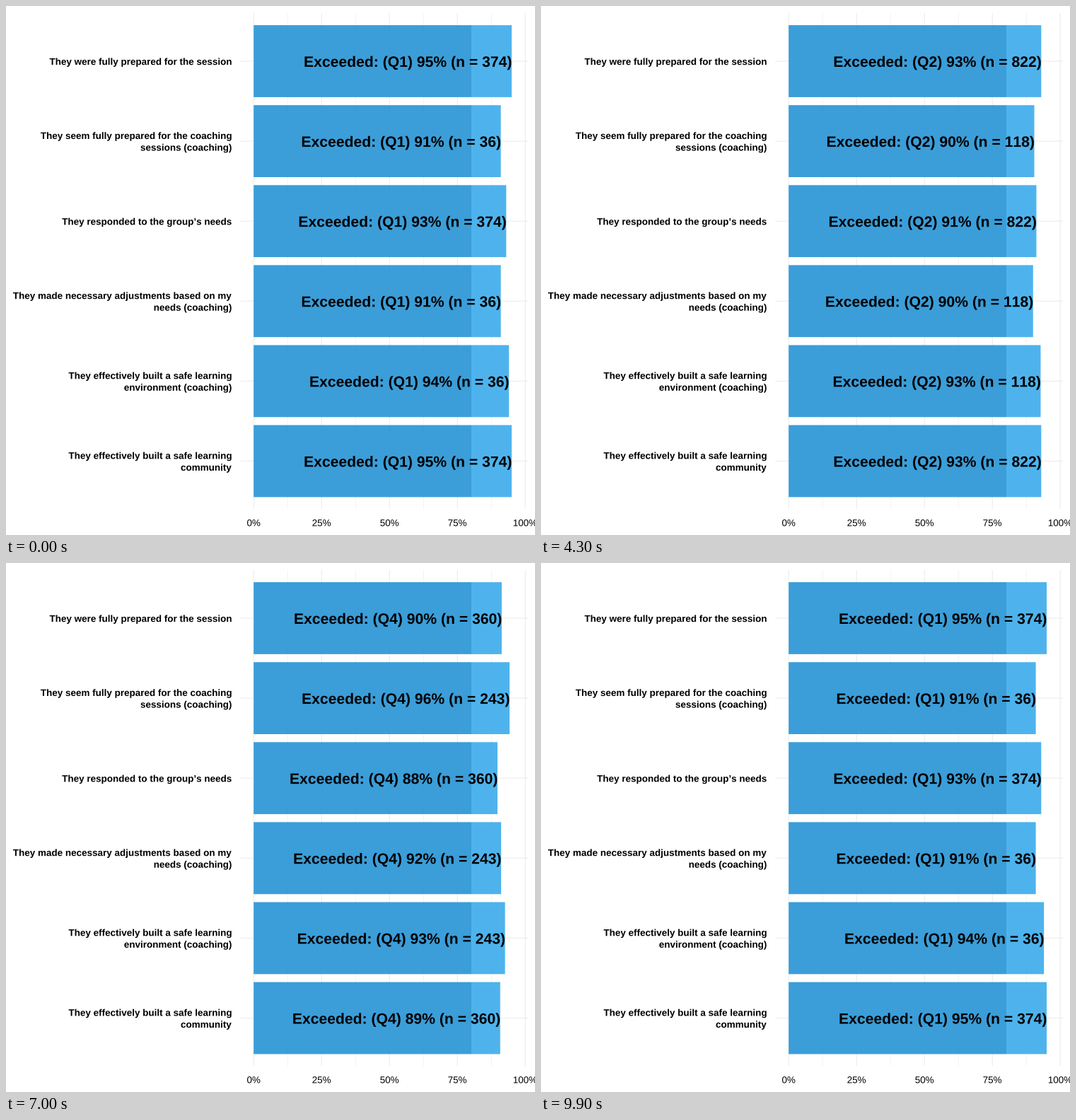
A matplotlib script for the animation above (10 s loop, 748 by 748 pixels).

```python
import matplotlib.pyplot as plt
from matplotlib.animation import FuncAnimation
from matplotlib.patches import PathPatch, Rectangle
from matplotlib.textpath import TextPath
from matplotlib.transforms import Affine2D

plt.rcParams["text.kerning_factor"] = 6  # plain advances, no pair kerning

SIZE, DPI = 748, 100
FRAMES, INTERVAL = 100, 100
STARTS, STEPS = (17, 42, 66, 91), 9

X0, X_SCALE = 350.2, 3.84
ROW0, ROW_STEP, BAR_HEIGHT = 78.0, 113.1, 101.8
TARGET_X = 658
PANEL = (331.3, 738, 10.1, 711.4)
DARK, LIGHT, GRID = "#2694D5", "#3BABEB", "#EBEBEB"

QUESTIONS = [
    ["They were fully prepared for the session"],
    ["They seem fully prepared for the coaching", "sessions (coaching)"],
    ["They responded to the group\u2019s needs"],
    ["They made necessary adjustments based on my", "needs (coaching)"],
    ["They effectively built a safe learning", "environment (coaching)"],
    ["They effectively built a safe learning", "community"],
]
IS_COACHING = (False, True, False, True, True, False)
SCORES = [
    (95, 91, 93, 91, 94, 95),
    (93, 90, 91, 90, 93, 93),
    (93, 92, 92, 90, 92, 93),
    (90, 96, 88, 92, 93, 89),
]
COUNTS = [(374, 36), (822, 118), (1606, 257), (360, 243)]

fig = plt.figure(figsize=(SIZE / DPI, SIZE / DPI), dpi=DPI, facecolor="white")
ax = fig.add_axes([0, 0, 1, 1])
ax.set_xlim(0, SIZE)
ax.set_ylim(SIZE, 0)
ax.axis("off")


def x_at(percent):
    return X0 + X_SCALE * percent


def row_y(row):
    return ROW0 + ROW_STEP * row


def text_path(text, size, weight="bold", align=1.0):
    """Outline whose ink is aligned on x = 0, with the baseline at y = 0."""
    path = TextPath((0, 0), text, size=size,
                    prop={"family": "Liberation Sans", "weight": weight})
    box = path.get_extents()
    shift = -(box.x0 + align * box.width)
    return path.transformed(Affine2D().translate(shift, 0).scale(1, -1))


def moved(path, x, y):
    return path.transformed(Affine2D().translate(x, y))


def add_text(path, x, y):
    patch = PathPatch(moved(path, x, y), fc="black", lw=0, zorder=4, snap=False)
    return ax.add_patch(patch)


def add_bar(x, y, width, color):
    bar = Rectangle((x, y - BAR_HEIGHT / 2), width, BAR_HEIGHT, fc=color,
                    alpha=0.9, lw=0, zorder=2, snap=False)
    return ax.add_patch(bar)


def add_line(xs, ys, width):
    ax.plot(xs, ys, color=GRID, lw=width * 72 / DPI, zorder=1,
            solid_capstyle="butt", snap=False)


left, right, top, bottom = PANEL
for i in range(9):
    x = x_at(12.5 * i)
    add_line((x, x), (top, bottom), 0.53 if i % 2 else 1.07)
    if i % 2 == 0:
        tick = text_path(f"{12.5 * i:.0f}%", 13.4, "normal", 0.5)
        add_text(tick, x, 735.4)

for row, lines in enumerate(QUESTIONS):
    y = row_y(row)
    add_line((left, right), (y, y), 1.07)
    add_bar(X0, y, TARGET_X - X0, DARK)
    first = y + 5.2 - 8.3 * (len(lines) - 1)
    for i, line in enumerate(lines):
        add_text(text_path(line, 13.46), 318.7, first + 16.6 * i)


def bar_label(quarter, row):
    count = COUNTS[quarter][IS_COACHING[row]]
    score = SCORES[quarter][row]
    return text_path(f"Exceeded: (Q{quarter + 1}) {score}% (n = {count})", 21.15)


labels = [[bar_label(q, row) for row in range(6)] for q in range(4)]
tips = [add_bar(TARGET_X, row_y(row), 0, LIGHT) for row in range(6)]
texts = [add_text(labels[0][row], 0, 0) for row in range(6)]


def state(frame):
    """Current quarter, next quarter and linear progress between them."""
    passed = [i for i, start in enumerate(STARTS) if start <= frame]
    if not passed:
        return 0, 0, 0
    quarter = passed[-1]
    progress = min(frame - STARTS[quarter] + 1, STEPS) / STEPS
    return quarter, (quarter + 1) % 4, progress


def update(frame):
    old, new, t = state(frame)
    shown = new if t > 0.5 else old
    for row in range(6):
        score = SCORES[old][row] * (1 - t) + SCORES[new][row] * t
        end = x_at(score)
        tips[row].set_width(end - TARGET_X)
        texts[row].set_path(moved(labels[shown][row], end - 0.6, row_y(row) + 8))
    return tips + texts


anim = FuncAnimation(fig, update, frames=FRAMES, interval=INTERVAL,
                     repeat=True, repeat_delay=0, blit=False)
plt.show()
```
